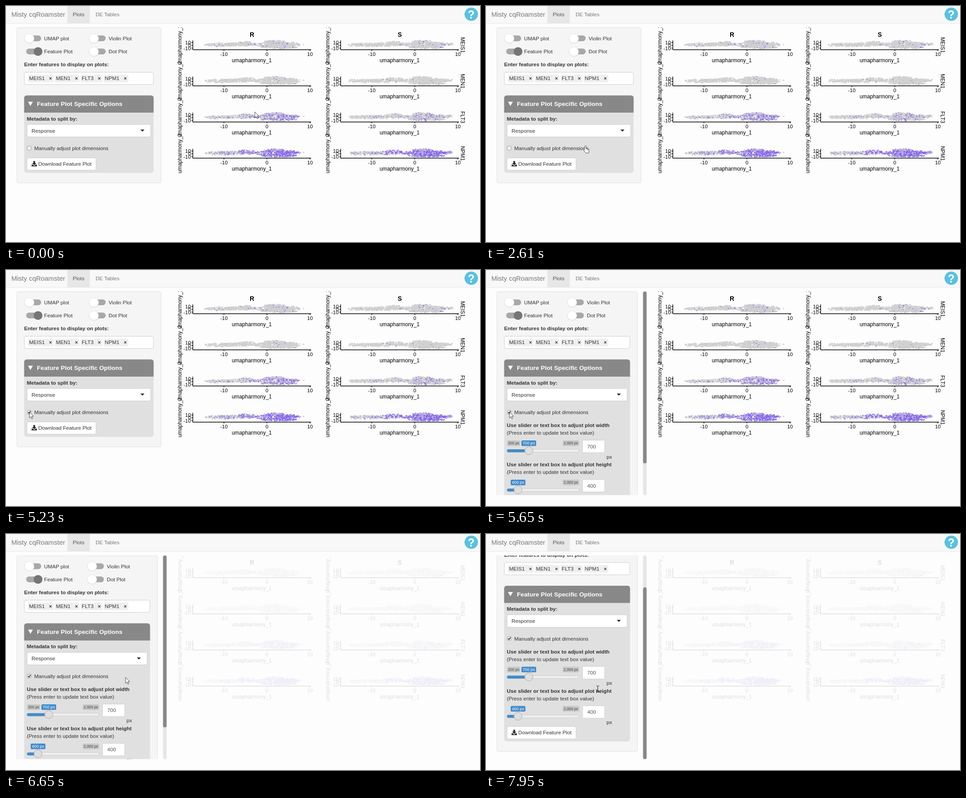
Recreate the animation shown at these times as an HTML page. Size 1058 by 529 pixels, loop 8000 ms.

```html
<!DOCTYPE html>
<html lang="en">
<head>
<meta charset="utf-8">
<style>
html, body { margin: 0; width: 100%; height: 100%; overflow: hidden; background: #fdfdfd; }
svg { display: block; width: 100vw; height: 100vh; font: 11.7px "Liberation Sans", Arial, sans-serif; }
.dots { fill: none; stroke-linecap: round; }
</style>
</head>
<body>
<svg id="stage" viewBox="0 0 1058 529"></svg>
<script>
const LOOP = 8000, OPEN_AT = 5520, MAX_SCROLL = 84.5;
const GENES = ['MEIS1', 'MEN1', 'FLT3', 'NPM1'];

// ---- drawing helpers ----
const text = (x, y, str, fill = '#333', size = 11.7, extra = '') =>
  `<text x="${x}" y="${y}" fill="${fill}" font-size="${size}" ${extra}>${str}</text>`;
const bold = (x, y, str, fill, size) => text(x, y, str, fill, size, 'font-weight="bold"');
const rect = (x, y, w, h, fill, r = 0, stroke = 'none') =>
  `<rect x="${x}" y="${y}" width="${w}" height="${h}" rx="${r}" fill="${fill}" stroke="${stroke}"/>`;
const circle = (x, y, r, fill, stroke = 'none') =>
  `<circle cx="${x}" cy="${y}" r="${r}" fill="${fill}" stroke="${stroke}"/>`;
const path = (d, fill, extra = '') => `<path d="${d}" fill="${fill}" ${extra}/>`;
const turned = (x, y, angle, str, size) =>
  `<g transform="translate(${x} ${y}) rotate(${angle})">${text(0, 0, str, '#000', size, 'text-anchor="middle"')}</g>`;

let seed = 7;
function random() {
  seed = (seed * 1664525 + 1013904223) % 4294967296;
  return seed / 4294967296;
}

// ---- navigation bar ----
function navbar() {
  return rect(0, 0, 1058, 39, '#f8f8f8') + rect(0, 38.5, 1058, 1, '#e7e7e7') +
    rect(137, 0, 50, 39, '#e7e7e7') +
    text(12, 24, 'Misty cqRoamster', '#777', 15) +
    text(149, 23, 'Plots', '#555') + text(200, 23, 'DE Tables', '#777') +
    circle(1038.5, 18.5, 15, '#5bc0de') +
    text(1038.5, 27.5, '?', '#fff', 25, 'font-weight="bold" text-anchor="middle"');
}

// ---- side panel ----
function toggle(x, y, label, on) {
  const knob = on ? circle(x + 26.5, y, 9.8, '#757575')
    : circle(x + 7, y + .5, 10.8, '#d9d9d9') + circle(x + 7, y, 10.4, '#fff', '#e6e6e6');
  return rect(x, y - 6.5, 33.5, 13, '#a8a8a8', 6.5) + knob + text(x + 40, y + 4.3, label);
}

function tag(x, w, name) {
  return rect(x, 154, w, 17, '#efefef', 2.5) + text(x + 2.5, 166.3, name) +
    bold(x + w - 10, 166, '×', '#333', 11);
}

function slider(y, name, value, knobX) {
  const pill = (x, w, str, fill, color, size) => rect(x, y + 34, w, 12.5, fill, 2.5) +
    text(x + w / 2, y + 43.3, str, color, size, 'text-anchor="middle"');
  return bold(46.5, y + 4.3, `Use slider or text box to adjust plot ${name}`) +
    text(46.5, y + 21.2, '(Press enter to update text box value)') +
    (value > 500 ? pill(47, 29.5, '200 px', '#c8c8c8', '#444', 8.4) : '') +
    pill(171, 37, '2,000 px', '#c8c8c8', '#444', 8.4) +
    pill(knobX - 16.5, 33, value + ' px', '#428bca', '#fff', 9.2) +
    rect(47, y + 54, 160.5, 6.5, '#eee', 3, '#ccc') + rect(47, y + 54, knobX - 47, 6.5, '#428bca', 3) +
    circle(knobX, y + 57, 9, '#dedede', '#aaa') +
    rect(215.5, y + 33.5, 49.5, 28, '#fff', 1, '#ccc') + text(226, y + 51.7, value, '#555') +
    text(269, y + 74.5, 'px');
}

function panel(open) {
  const edge = open ? 321.5 : 329.5, bottom = open ? 549.5 : 374;
  const shift = open ? -4 : 0, drop = open ? 175.7 : 0;
  const caret = edge - 29.5;
  let out = rect(24.5, 48.5, edge - 8, open ? 523.5 : 348, '#f5f5f5', 3, '#e0e0e0') +
    toggle(45, 72.5, 'UMAP plot') + toggle(189 + shift, 72.5, 'Violin Plot') +
    toggle(45, 102, 'Feature Plot', true) + toggle(189 + shift, 102, 'Dot Plot') +
    bold(40.5, 135.3, 'Enter features to display on plots:') +
    rect(41, 148.5, edge - 41.5, 27.5, '#fff', 3, '#ccc') +
    tag(49, 57, GENES[0]) + tag(109, 55, GENES[1]) + tag(166.5, 48.5, GENES[2]) + tag(218, 55, GENES[3]) +
    rect(40.5, 200.5, edge - 40.5, bottom - 200.5, '#e0e0e0', 6) +
    path(`M40.5 239V206.500q0-6 6-6H${edge - 6}q6 0 6 6V239Z`, '#888') +
    path('M49 214.500H60L54.500 224Z', '#fff') +
    bold(69, 224, 'Feature Plot Specific Options', '#fff', 13.7) +
    bold(46.5, 256.7, 'Metadata to split by:') +
    rect(47, 265.5, edge - 53.5, 28, '#fff', 3, '#ccc') + text(57, 283.5, 'Response') +
    path(`M${caret} 277h9l-4.500 4.500Z`, '#222') +
    rect(47.5, 314.5, 8.5, 8.5, '#f2f2f2', 1.5, '#999') +
    text(63, 323, 'Manually adjust plot dimensions');
  if (open) out += slider(348, 'width', 700, 95.5) + slider(436, 'height', 400, 71.5);
  return out + `<g transform="translate(0 ${drop})">` +
    rect(47, 340.5, 154, 27.5, '#fff', 3, '#ccc') +
    path('M61 347.500h4v4.500h3l-5 5-5-5h3Z', '#333') +
    path('M57 355.500h3l3 3 3-3h3v4H57Z', '#333') +
    text(72, 358, 'Download Feature Plot') + '</g>';
}

// ---- feature plots ----
// cx, cy, rx, ry, dot count, share of coloured dots
const LOBES = [
  [478, 87, 35, 4, 130, .2], [515, 86.5, 42, 4, 150, .4], [537, 83.5, 20, 4, 80, .8],
  [600, 80.5, 24, 3.5, 120, .6], [600, 86.5, 51, 5, 330, 1], [609, 92.5, 41, 3, 160, 1.2],
  [630, 85, 24, 4, 100, 1], [652, 87, 6, 3, 10, 1], [664, 85.5, 1, 1, 2, .3]
];
const RATES = [[.07, .012, .3, .85], [.05, .012, .13, .85]];

function scatter(col, row) {
  const dots = ['', '', ''];
  const lobes = col ? [...LOBES, [447, 87, 13, 4, 35, .1], [660, 85, 8, 3, 20, .7]] : LOBES;
  for (const [cx, cy, rx, ry, count, share] of lobes) {
    for (let i = 0; i < count; i++) {
      const a = random() * 2 * Math.PI, r = Math.sqrt(random());
      const spot = `M${(cx + rx * r * Math.cos(a)).toFixed(1)} ${(cy + ry * r * Math.sin(a)).toFixed(1)}h.01`;
      dots[0] += spot;
      if (random() < RATES[col][row] * share) dots[random() < .45 ? 1 : 2] += spot;
    }
  }
  return ['#d0d0d0', '#aa96ee', '#8360ee'].map((color, i) =>
    `<path class="dots" d="${dots[i]}" stroke="${color}" stroke-width="${i ? 2 : 2.9}"/>`).join('');
}

function plot(col, row) {
  const mid = (x, y, str, size = 11.9) => text(x, y, str, '#000', size, 'text-anchor="middle"');
  let out = scatter(col, row), ticks = '';
  [-10, 0, 10].forEach((v, i) => {
    const x = 486.5 + 96 * i, y = 94.5 - 6.25 * i;
    ticks += `M${x} 98v3M417 ${y}h-3`;
    out += mid(x, 111.6, v, 11.4) + text(412.5, y + 4, v, '#000', 11.4, 'text-anchor="end"');
  });
  out += path('M417 77V98H681' + ticks, 'none', 'stroke="#000" stroke-width="1.3"') +
    mid(548.5, 125.5, 'umapharmony_1') + turned(391.5, 87.5, -90, 'umapharmony_2', 11.9);
  if (!row) out += text(549, 68.5, 'RS'[col], '#000', 14, 'font-weight="bold" text-anchor="middle"');
  if (col) out += turned(684.5, 87.5, 90, GENES[row], 11.9);
  return `<g transform="translate(${330 * col} ${81 * row})">${out}</g>`;
}

const plots = [0, 1].map(col => GENES.map((_, row) => plot(col, row)).join('')).join('');

const outline = 'stroke="#222" stroke-width=".8" stroke-linejoin="round"';
const pointers = {
  arrow: path('M.4.4V13.500L3.400 10.800 5.500 15.600 7.500 14.700 5.500 10H9.600Z', '#fff', outline),
  hand: path('M-1 0Q.5-2 2 0V5.500L6.500 6.300Q9 7 8.800 9.500L7.500 15.500H1L-3.500 9.500Q-3.500 7-1 8.700Z', '#fff', outline) +
    path('M4.300 6v3M6.600 6.500v3', 'none', outline),
  beam: path('M-3-6.500H-.8L0-5.700.8-6.500H3M0-5.700V6M-3 7H-.8L0 6 .8 7H3', 'none', 'stroke="#111"')
};

const stage = document.getElementById('stage');
stage.innerHTML = `<defs>
  <clipPath id="side"><rect y="48" width="362" height="456.500"/></clipPath>
  <clipPath id="area"><rect x="362" y="48" width="696" height="340"/></clipPath></defs>` +
  rect(0, 0, 1058, 529, '#fdfdfd') + navbar() +
  `<g clip-path="url(#area)"><g id="plots">${plots}</g></g>
  <g clip-path="url(#side)">
    <g id="closed">${panel(false)}</g>
    <g id="opened">${panel(true)}</g>
    <g id="check">${path('M49.300 318.800l2 2.200 3.600-4.800', 'none', 'stroke="#222" stroke-width="1.600"')}</g>
    <g id="bar">${rect(350.5, 48, 8, 457, '#e6e6e6', 4)}<g id="thumb">${rect(350.5, 48, 8, 385.5, '#888', 4)}</g></g>
  </g><g id="cursor">` +
  Object.entries(pointers).map(([name, art]) => `<g id="${name}">${art}</g>`).join('') + '</g>';

// ---- motion ----
// time, x, y of the pointer
const TRACK = [
  [0, 555, 237], [1520, 555, 237], [2360, 267, 297], [2400, 267, 297], [2610, 222, 314],
  [2850, 130, 319], [3220, 43, 315], [3570, 43, 315], [3770, 45, 315], [3900, 45, 315],
  [3970, 47, 315], [4110, 48, 315], [4250, 48, 315], [4310, 49, 315], [4840, 49, 315],
  [5200, 52, 318], [5800, 52, 318], [6580, 266.5, 321], [7600, 266.5, 321],
  [7740, 278, 316], [7950, 249.5, 347], [LOOP, 249.5, 347]
];

function pointerAt(t) {
  const i = TRACK.findIndex(key => key[0] > t);
  const [t0, x0, y0] = TRACK[i - 1], [t1, x1, y1] = TRACK[i];
  let p = (t - t0) / (t1 - t0);
  if (t1 - t0 > 500) p = p * p * (3 - 2 * p);
  return [x0 + (x1 - x0) * p, y0 + (y1 - y0) * p];
}

const easeOut = (t, start, length, power) =>
  1 - (1 - Math.min(1, Math.max(0, (t - start) / length))) ** power;
const set = (id, name, value) => document.getElementById(id).setAttribute(name, value);
const show = (id, on) => set(id, 'display', on ? 'inline' : 'none');

function frame(now) {
  const t = now % LOOP, open = t >= OPEN_AT;
  const scroll = MAX_SCROLL * easeOut(t, 6650, 740, 2.5);
  show('closed', !open);
  show('opened', open);
  show('bar', open);
  show('check', t >= 5100);
  set('opened', 'transform', `translate(0 ${-scroll})`);
  set('check', 'transform', `translate(0 ${-scroll})`);
  set('thumb', 'transform', `translate(0 ${t < 7050 ? 0 : scroll * 71.5 / MAX_SCROLL})`);
  set('plots', 'opacity', 1 - .88 * easeOut(t, 5840, 350, 1.5));

  const [x, y] = pointerAt(t);
  const overLabel = x > 60 && x < 232 && y > 310 && y < 326;
  const shape = t >= 7880 ? 'beam' : overLabel ? 'hand' : 'arrow';
  for (const name in pointers) show(name, name === shape);
  set('cursor', 'transform', `translate(${x} ${y})`);
  requestAnimationFrame(frame);
}
requestAnimationFrame(frame);
</script>
</body>
</html>
```
